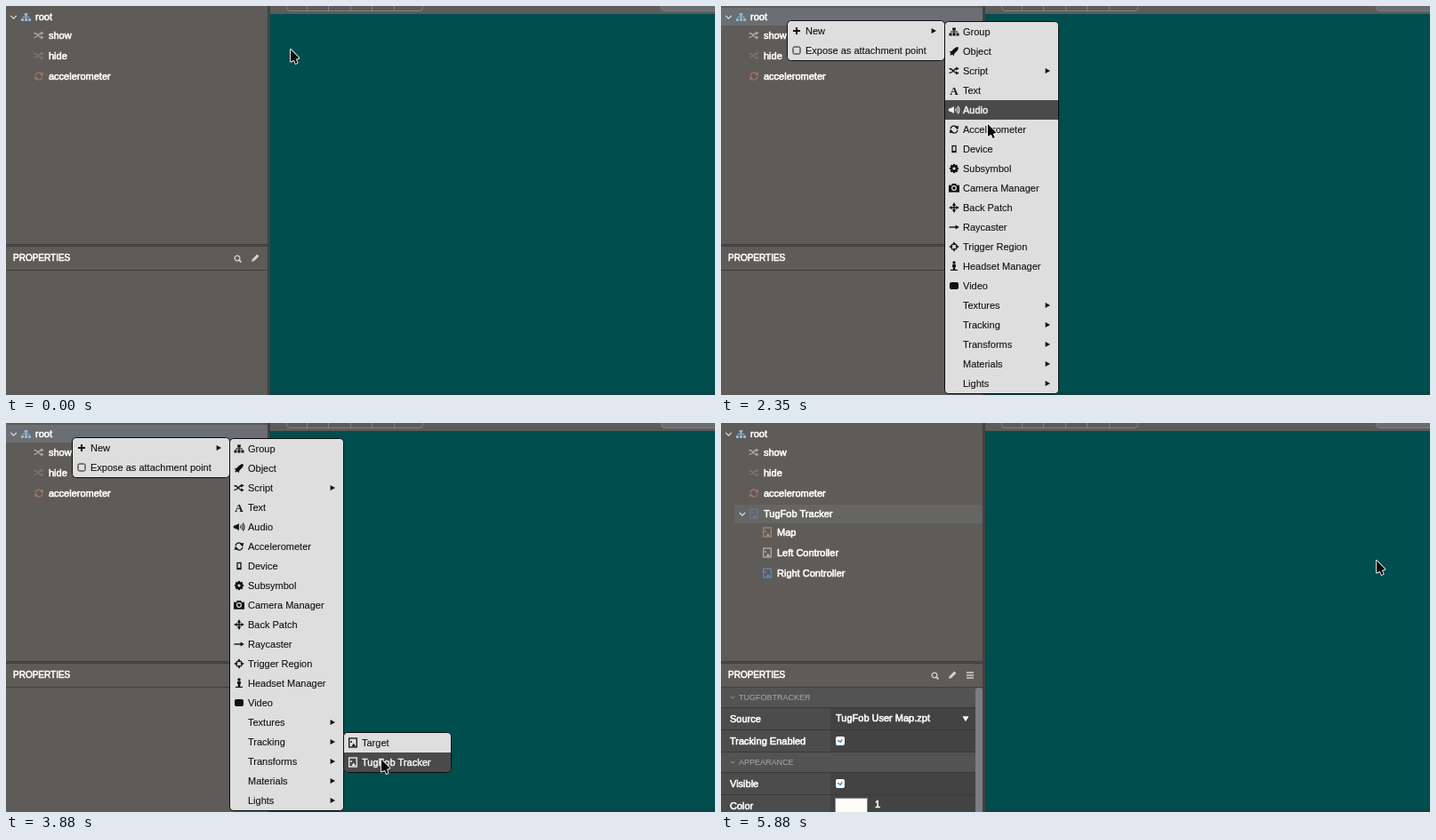
Write an HTML page with a canvas that moves like this. It is 797 px wide and 438 px high and loops after 6.59 s.

```html
<!DOCTYPE html>
<html lang="en">
<head>
<meta charset="utf-8">
<title>New node</title>
<style>
html, body { margin: 0; width: 100%; height: 100%; overflow: hidden; background: #5f5b58; }
canvas { display: block; }
</style>
</head>
<body>
<canvas id="stage" width="797" height="438"></canvas>
<script>
const ctx = document.getElementById('stage').getContext('2d');
const SANS = '"Liberation Sans", Arial, sans-serif';
const MONO = '"Liberation Mono", "Courier New", monospace';
const LOOP = 6590, TICK = 1000 / 17, TAU = Math.PI * 2;
const UP = -TAU / 4, DOWN = TAU / 4, LEFT = TAU / 2, RIGHT = 0;
const NODE = 'TugFob Tracker', MENU_BG = '#dedede', ROW = 22;

// ---- drawing helpers ----
function rect(x, y, w, h, fill) {
  ctx.fillStyle = fill;
  ctx.fillRect(x, y, w, h);
}

function box(x, y, w, h, r, fill, border) {
  ctx.beginPath();
  ctx.roundRect(x, y, w, h, r);
  if (fill) { ctx.fillStyle = fill; ctx.fill(); }
  if (border) { ctx.strokeStyle = border; ctx.lineWidth = 1; ctx.stroke(); }
}

function text(str, x, y, color, { size = 11, heavy = 0, align = 'left', font = SANS, weight = '' } = {}) {
  ctx.font = `${weight} ${size}px ${font}`;
  ctx.textAlign = align;
  ctx.fillStyle = ctx.strokeStyle = color;
  ctx.fillText(str, x, y);
  if (heavy) { ctx.lineWidth = heavy; ctx.strokeText(str, x, y); }
}

const label = (str, x, y, size = 11) => text(str, x, y, '#fff', { size, heavy: 0.6 });

// ---- icon parts, centred on x,y ----
function bar(w, h, x = 0, y = 0) { ctx.fillRect(x - w / 2, y - h / 2, w, h); }
function frame(w, h) { ctx.strokeRect(-w / 2, -h / 2, w, h); }
function ring(r, from = 0, to = TAU) { ctx.beginPath(); ctx.arc(0, 0, r, from, to); ctx.stroke(); }
function dot(x, y, r) { ctx.beginPath(); ctx.arc(x, y, r, 0, TAU); ctx.fill(); }
function shape(n, r, turn, x = 0, y = 0) {
  ctx.beginPath();
  for (let i = 0; i < n; i++) {
    const a = turn + i * TAU / n;
    ctx.lineTo(x + r * Math.cos(a), y + r * Math.sin(a));
  }
  ctx.closePath();
  ctx.fill();
}
const tri = (r, turn, x, y) => shape(3, r, turn, x, y);
function around(n, draw) {
  for (let i = 0; i < n; i++) {
    ctx.save();
    ctx.rotate(i * TAU / n);
    draw();
    ctx.restore();
  }
}
function picture(w, h) {
  frame(w, h);
  dot(-2, -1, 1);
  tri(2.6, UP, 0.8, h / 2 - 2);
}
function vee(r) {
  ctx.beginPath();
  ctx.moveTo(-r, -r / 2);
  ctx.lineTo(0, r / 2);
  ctx.lineTo(r, -r / 2);
  ctx.stroke();
}

const icons = {
  sitemap() {
    bar(3.6, 3, 0, -3);
    bar(8, 1);
    bar(1, 4);
    for (const x of [-4, 0, 4]) bar(3, 3, x, 3);
  },
  shuffle() {
    for (const y of [-2.5, 2.5]) {
      ctx.beginPath();
      ctx.moveTo(-5.5, -y);
      ctx.bezierCurveTo(0, -y, -1, y, 3, y);
      ctx.stroke();
      tri(2.4, RIGHT, 3.3, y);
    }
  },
  refresh() {
    around(2, () => { ring(4, LEFT + 0.2, TAU - 0.7); tri(2.7, UP / 2, 3.4, -2.2); });
  },
  rocket() {
    ctx.rotate(TAU / 8);
    ctx.beginPath(); ctx.ellipse(0, -1, 2.2, 5.5, 0, 0, TAU); ctx.fill();
    tri(4, UP, 0, 2);
    bar(1.5, 2, 0, 5);
  },
  letter() { text('A', 0, 4.5, '#111', { size: 13, align: 'center', weight: 'bold', font: '"Liberation Serif", serif' }); },
  volume() {
    bar(3, 3.6, -4);
    tri(4.6, LEFT, -2.4);
    ctx.lineWidth = 1.1;
    for (const r of [2, 4, 6]) ring(r, -0.8, 0.8);
  },
  mobile() { frame(4, 7); bar(4, 1.6, 0, 2.8); },
  cog() { around(8, () => bar(2.2, 3, 0, -3.6)); ctx.lineWidth = 2.4; ring(2.8); },
  camera() {
    bar(12, 8, 0, 0.7);
    bar(5, 2, 0, -4);
    ctx.strokeStyle = MENU_BG;
    ring(2.4);
  },
  move() { around(4, () => { bar(1.4, 4, 0, -2); tri(2.4, UP, 0, -3.5); }); },
  arrow() { bar(9, 1.4, -1); tri(2.8, RIGHT, 3); },
  aim() { ring(3.2); around(4, () => bar(1.6, 3.4, 0, -3.5)); },
  person() { dot(0, -4, 1.7); bar(3.8, 3, 0, -0.5); bar(2.4, 4, 0, 2); bar(8, 1.2, 0, 4.4); },
  block() { box(-5, -4, 10, 8, 2, ctx.fillStyle); },
  film() { bar(7.5, 7.6, -2); tri(4, LEFT, 3.6); },
  image() { picture(10.8, 8); },
  cube() {
    shape(6, 5.3, UP);
    ctx.fillStyle = MENU_BG;
    around(3, () => bar(0.9, 4.6, 0, 2.5));
  },
  file() { picture(8.6, 10); },
  plus() { bar(8, 2); bar(2, 8); },
  square() { box(-4, -4, 8, 8, 1.5, null, ctx.strokeStyle); },
  search() { ring(2.9); ctx.rotate(TAU / 8); bar(4, 1.9, 4.2); },
  pencil() { ctx.rotate(TAU / 8); bar(3, 7.5, 0, -1); tri(2, DOWN, 0, 3.6); },
  bars() { for (const y of [-3, 0, 3]) bar(8, 1.5, 0, y); },
  chevron() { vee(3.3); },
  fold() { ctx.lineWidth = 1; vee(2.3); },
  next() { tri(3.6, RIGHT, -0.6); },
  down() { tri(4, DOWN, 0, -0.8); },
  check() { ctx.rotate(-0.25); vee(2.6); }
};

function icon(name, x, y, color) {
  ctx.save();
  ctx.translate(x, y);
  ctx.fillStyle = ctx.strokeStyle = color;
  ctx.lineWidth = 1.3;
  icons[name]();
  ctx.restore();
}

// ---- menus ----
const item = (glyph, name, more) => ({ glyph, name, more });
const menus = {
  main: { x: 75, y: 17, w: 176, items: [item('plus', 'New', true), item('square', 'Expose as attachment point')] },
  create: { x: 252, y: 18, w: 127, items: [
    item('sitemap', 'Group'), item('rocket', 'Object'), item('shuffle', 'Script', true), item('letter', 'Text'),
    item('volume', 'Audio'), item('refresh', 'Accelerometer'), item('mobile', 'Device'), item('cog', 'Subsymbol'),
    item('camera', 'Camera Manager'), item('move', 'Back Patch'), item('arrow', 'Raycaster'),
    item('aim', 'Trigger Region'), item('person', 'Headset Manager'), item('block', 'Video'),
    ...['Textures', 'Tracking', 'Transforms', 'Materials', 'Lights'].map(n => item('', n, true))
  ] },
  textures: { x: 380, y: 327, w: 141, items: [
    item('film', 'Camera Texture'), item('image', 'Image Texture'), item('block', 'Video Texture'),
    item('move', 'Transformed Texture'), item('cube', 'Cubemap Texture')
  ] },
  tracking: { x: 380, y: 349, w: 120, items: [item('file', 'Target'), item('file', NODE)] }
};

function drawMenu({ x, y, w, items }, [px, py]) {
  const h = items.length * ROW;
  const over = px >= x && px < x + w ? Math.floor((py - y) / ROW) : -1;
  ctx.save();
  box(x - 0.5, y - 0.5, w + 1, h + 1, 4, MENU_BG);
  ctx.clip();
  items.forEach(({ glyph, name, more }, i) => {
    const mid = y + (i + 0.5) * ROW, on = i === over;
    const color = on ? '#f2f2f2' : '#111';
    if (on) rect(x, mid - ROW / 2, w, ROW, '#4a4a4a');
    if (glyph) icon(glyph, x + 10, mid, color);
    text(name, x + 20, mid + 4, color, { heavy: on ? 0.5 : 0.1 });
    if (more) icon('next', x + w - 12, mid, color);
  });
  ctx.restore();
  box(x - 0.5, y - 0.5, w + 1, h + 1, 4, null, '#0c0c0c');
}

// ---- panels ----
function drawShell() {
  rect(0, 0, 797, 438, '#5f5b58');
  rect(297, 9, 500, 429, '#004e4e');
  rect(297, 434, 500, 4, '#0c4547');
  rect(294, 0, 3, 438, '#3d3d3f');
  rect(295, 0, 1, 438, '#48474a');
  box(315.5, -10.5, 153, 16, 4, null, '#858381');
  for (let i = 0; i < 5; i++) rect(Math.floor(338 + i * 24.5), 0, 1, 5, '#858381');
  box(736.5, -10.5, 80, 16, 4, '#696d71', '#7d8083');
  rect(0, 268, 294, 3, '#3f3e3e');
  rect(0, 269, 294, 1, '#4d4b4a');
  rect(0, 297, 294, 1, '#403f3f');
}

function treeRow(i, depth, glyph, color, name) {
  const x = 7 + depth * 15, y = 10 + i * 23;
  icon(glyph, x, y, color);
  label(name, x + 11, y + 4);
}

function drawTree(rootOn, added) {
  if (rootOn) rect(0, 2, 294, 20, '#6b6f73');
  icon('chevron', 8.5, 12.5, '#ddd');
  icon('sitemap', 22.5, 12.5, '#8fb9d6');
  label('root', 33, 16);
  treeRow(1, 2, 'shuffle', '#a9a9a9', 'show');
  treeRow(2, 2, 'shuffle', '#75757a', 'hide');
  treeRow(3, 2, 'refresh', '#a17766', 'accelerometer');
  if (!added) return;
  rect(15, 92, 279, 21, '#656564');
  icon('chevron', 24, 102.5, '#ddd');
  treeRow(4, 2, 'file', '#6b7598', NODE);
  ctx.save();
  ctx.translate(0, -2);
  treeRow(5, 3, 'file', '#a58a76', 'Map');
  treeRow(6, 3, 'file', '#b0b0b0', 'Left Controller');
  treeRow(7, 3, 'file', '#5f8abb', 'Right Controller');
  ctx.restore();
}

function checkbox(y) {
  box(129, y + 7, 10, 10, 2, '#fff');
  icon('check', 134, y + 12, '#2d7fc0');
}

// Rows with a value painter are fields; the others are section headings.
const properties = [
  ['TUGFOBTRACKER'],
  ['Source', y => { label('TugFob User Map.zpt', 129, y + 15); icon('down', 275, y + 12, '#fff'); }],
  ['Tracking Enabled', checkbox],
  ['APPEARANCE'],
  ['Visible', checkbox],
  ['Color', y => { box(128.5, y + 3.5, 36, 30, 0, '#fffdf8', '#8a8a8a'); label('1', 173, y + 14); }]
];

function drawProperties(added) {
  label('PROPERTIES', 8, 287, 10);
  const tools = added ? ['search', 'pencil', 'bars'] : ['search', 'pencil'];
  tools.forEach((name, i) => icon(name, 300 - 20 * (tools.length - i), 284, '#d2d2d2'));
  if (!added) return;
  rect(0, 298, 294, 140, '#393939');
  let y = 298;
  for (const [name, paint] of properties) {
    const h = paint ? 24 : 22;
    rect(0, y, 286, h, paint ? '#434343' : '#535353');
    if (paint) {
      rect(0, y, 123, h, '#4c4c4c');
      label(name, 10, y + 16);
      paint(y);
    } else {
      icon('fold', 13, y + 11, '#a0a0a0');
      text(name, 20, y + 14, '#a8a8a8', { size: 9 });
    }
    y += h + 1;
  }
  rect(286, 298, 8, 140, '#4a4a4c');
  box(286, 298, 8, 150, 3, '#7c7c86');
}

function drawDialog(focused, [px, py]) {
  ctx.save();
  ctx.shadowColor = 'rgba(0,0,0,.4)';
  ctx.shadowBlur = 24;
  ctx.shadowOffsetY = 6;
  box(437, 40, 357, 171, 30, 'rgba(10,54,57,.8)');
  box(434, 4, 360, 184, 5, '#515151');
  ctx.restore();
  box(434, 4, 360, 22, [5, 5, 0, 0], '#4b4b4b');
  rect(434, 26, 360, 1, '#444');
  ['#fa6058', '#f5b52e', '#2ec440'].forEach((color, i) => {
    ctx.fillStyle = color;
    dot(448 + i * 20, 15, 6);
  });
  text('NEW NODE', 613.5, 18, '#fff', { size: 9, heavy: 0.5, align: 'center' });
  label('Choose a name:', 474, 67);
  box(474.5, 79.5, 279, 23, 3, '#414141', focused ? '#b0b0b0' : '#858585');
  if (focused) rect(480, 85, 92, 13, '#7c98b5');
  text(NODE, 480, 95, '#fff', { font: MONO, weight: 'bold' });
  ['CANCEL', 'OK'].forEach((name, i) => {
    const x = 631 + i * 73;
    const on = px >= x && px < x + 70 && py >= 138 && py < 168;
    box(x + 0.5, 138.5, 69, 29, 3, on ? '#585858' : '#434343', '#858585');
    text(name, x + 35, 157, '#f2f2f2', { size: 9, heavy: 0.4, align: 'center' });
  });
}

// ---- pointer: each move runs from one tick to another and ends at x,y ----
const HOME = [319, 48];
const moves = [
  [6, 16, 74, 15], [24, 30, 163, 27], [30, 36, 270, 31], [36, 40, 299, 132], [40, 47, 324, 327],
  [48, 51, 334, 352], [54, 58, 387, 356], [59, 66, 421, 378], [78, 90, 736, 154]
];

// Slow down only where the pointer rests before or after a move.
function pointerAt(tick) {
  let [x, y] = HOME;
  moves.forEach(([from, to, nx, ny], i) => {
    const a = i && moves[i - 1][1] === from ? 1 : 0;
    const b = moves[i + 1]?.[0] === to ? 1 : 0;
    const u = Math.min(1, Math.max(0, (tick - from) / (to - from)));
    const k = (a + b - 2) * u ** 3 + (3 - 2 * a - b) * u ** 2 + a * u;
    x += (nx - x) * k;
    y += (ny - y) * k;
  });
  return [x, y];
}

function drawPointer([x, y]) {
  ctx.save();
  ctx.translate(Math.round(x) + 1, Math.round(y) + 1);
  ctx.lineJoin = 'round';
  ctx.strokeStyle = '#f4f4f4';
  ctx.fillStyle = '#0a0a0a';
  const head = new Path2D('M0 0V13.6L9.4 9.6Z');
  const tail = new Path2D('M3 10L5.6 16L7.6 15L5 9Z');
  ctx.lineWidth = 1.8;
  for (const part of [head, tail]) ctx.stroke(part);
  for (const part of [head, tail]) ctx.fill(part);
  ctx.restore();
}

function render(ms) {
  const tick = Math.floor((ms + 5) / TICK);
  const hover = pointerAt(tick - 1); // highlights trail the pointer by one tick
  const menuOpen = tick >= 20 && tick < 72;
  const added = tick >= 100;

  drawShell();
  drawTree(menuOpen, added);
  drawProperties(added);
  if (menuOpen) {
    drawMenu(menus.main, hover);
    if (tick >= 28) drawMenu(menus.create, hover);
    if (tick >= 52) drawMenu(menus.tracking, hover);
    else if (tick >= 48) drawMenu(menus.textures, hover);
  }
  if (tick >= 72 && tick < 98) drawDialog(tick < 95, hover);
  drawPointer(pointerAt(tick));
}

const start = performance.now();
function loop() {
  render((performance.now() - start) % LOOP);
  requestAnimationFrame(loop);
}
loop();
</script>
</body>
</html>
```
